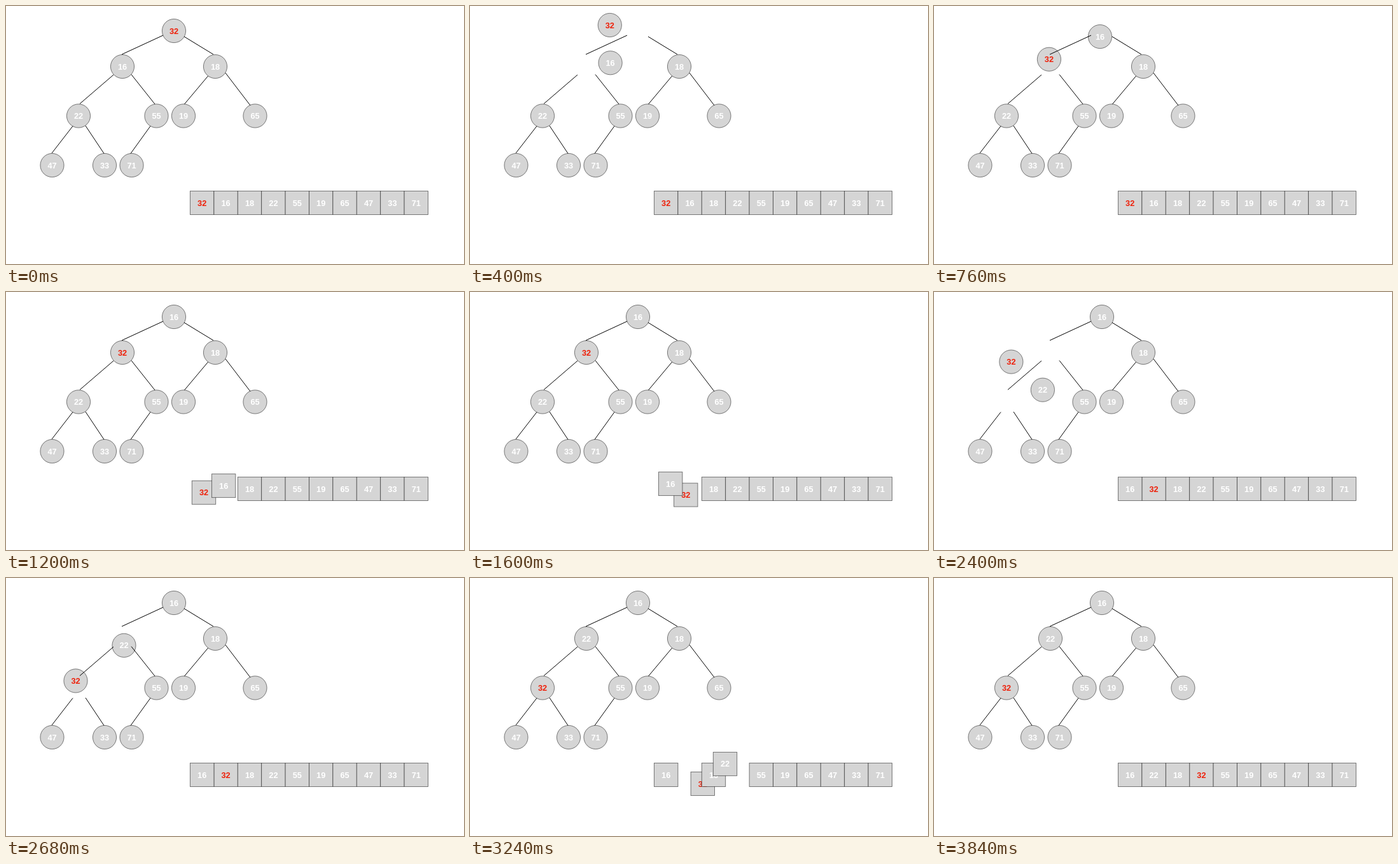
An HTML page that plays this animation: 720 px wide and 405 px high, repeating every 4.36 s.

```html
<!DOCTYPE html>
<html lang="en">
<head>
<meta charset="utf-8">
<title>Heap sift-down</title>
<style>
  html, body { margin: 0; width: 100%; height: 100%; overflow: hidden; background: #fff; }
  svg { display: block; width: 720px; height: 405px; }
  circle, rect { fill: #d5d5d5; stroke: #000; stroke-opacity: .55; stroke-width: .9; }
  line { stroke: #000; stroke-width: 1; }
  text { font: bold 12.8px "Liberation Sans", Arial, sans-serif; text-anchor: middle; fill: #fff; }
  .hot { fill: #ee220c; }
</style>
</head>
<body>
<svg id="stage" viewBox="0 0 720 405"></svg>
<script>
const LOOP = 4360, STEP = 40, SWAP = 960;
const stage = document.getElementById('stage');

const values = [32, 16, 18, 22, 55, 19, 65, 47, 33, 71];
const spots = [
  [264, 39], [183, 95], [329, 95], [114, 172.5], [236.5, 172.5],
  [279, 172.5], [391.5, 172.5], [72.5, 250], [155, 250], [197.5, 250]
];
const slots = values.map((_, i) => [308.2 + 37.4 * i, 309]);
const edges = [
  [247, 46, 182, 76], [280, 48, 326, 76], [169, 108, 116, 153.5],
  [197, 107.5, 234, 154], [317.5, 110, 280.5, 154], [345, 105, 384, 156],
  [105, 188.5, 72, 231], [125, 188, 154, 231.5], [227, 188.5, 196, 231.5]
];

function add(parent, tag, attrs) {
  const el = document.createElementNS('http://www.w3.org/2000/svg', tag);
  for (const k in attrs) el.setAttribute(k, attrs[k]);
  return parent.appendChild(el);
}

function makeItems(places, shape, attrs) {
  return values.map((value, i) => {
    const el = add(stage, 'g', {});
    add(el, shape, attrs);
    add(el, 'text', { y: 4.6, class: value === 32 ? 'hot' : '' }).textContent = value;
    return { el, home: places[i] };
  });
}

const nodes = makeItems(spots, 'circle', { r: 18.6 });
const cells = makeItems(slots, 'rect', { x: -18.7, y: -18.5, width: 37.4, height: 37 });
for (const [x1, y1, x2, y2] of edges) add(stage, 'line', { x1, y1, x2, y2 });

// One entry per swap: items, places, the two item/place indices, half arc angles in degrees.
const swaps = [
  { items: nodes, places: spots, from: 0, to: 1, other: 1, arcs: [72, 40.5] },
  { items: cells, places: slots, from: 0, to: 1, other: 1, arcs: [73.6, 63] },
  { items: nodes, places: spots, from: 1, to: 3, other: 3, arcs: [70, 60] },
  { items: cells, places: slots, from: 1, to: 3, other: 3, arcs: [48.9, 58.6] }
];

// cubic-bezier(.42, 0, .58, 1)
function easeInOut(x) {
  let lo = 0, hi = 1, s = x;
  for (let i = 0; i < 24; i++) {
    s = (lo + hi) / 2;
    const r = 1 - s;
    if (1.26 * s * r * r + 1.74 * s * s * r + s * s * s < x) lo = s; else hi = s;
  }
  return s * s * (3 - 2 * s);
}

// Point on a circular arc from a to b, running counter-clockwise.
function arcPoint(a, b, degrees, p) {
  if (p <= 0) return a;
  if (p >= 1) return b;
  const dx = b[0] - a[0], dy = b[1] - a[1], len = Math.hypot(dx, dy);
  const ux = dx / len, uy = dy / len;
  const half = degrees * Math.PI / 180, r = len / 2 / Math.sin(half);
  const angle = (2 * p - 1) * half;
  const along = r * Math.sin(angle), out = r * (Math.cos(angle) - Math.cos(half));
  return [
    (a[0] + b[0]) / 2 + ux * along - uy * out,
    (a[1] + b[1]) / 2 + uy * along + ux * out
  ];
}

function draw(t) {
  const at = new Map([...nodes, ...cells].map(item => [item, item.home]));
  swaps.forEach(({ items, places, from, to, other, arcs }, i) => {
    const x = (t - i * SWAP) / SWAP;
    if (x <= 0) return;
    const p = x >= 1 ? 1 : easeInOut(x);
    at.set(items[0], arcPoint(places[from], places[to], arcs[0], p));
    at.set(items[other], arcPoint(places[to], places[from], arcs[1], p));
  });
  for (const [item, [x, y]] of at) {
    item.el.setAttribute('transform', `translate(${x.toFixed(2)} ${y.toFixed(2)})`);
  }
}

const start = performance.now();
function tick() {
  const t = (performance.now() - start) % LOOP;
  draw(Math.floor(t / STEP) * STEP);
  requestAnimationFrame(tick);
}
draw(0);
requestAnimationFrame(tick);
</script>
</body>
</html>
```
